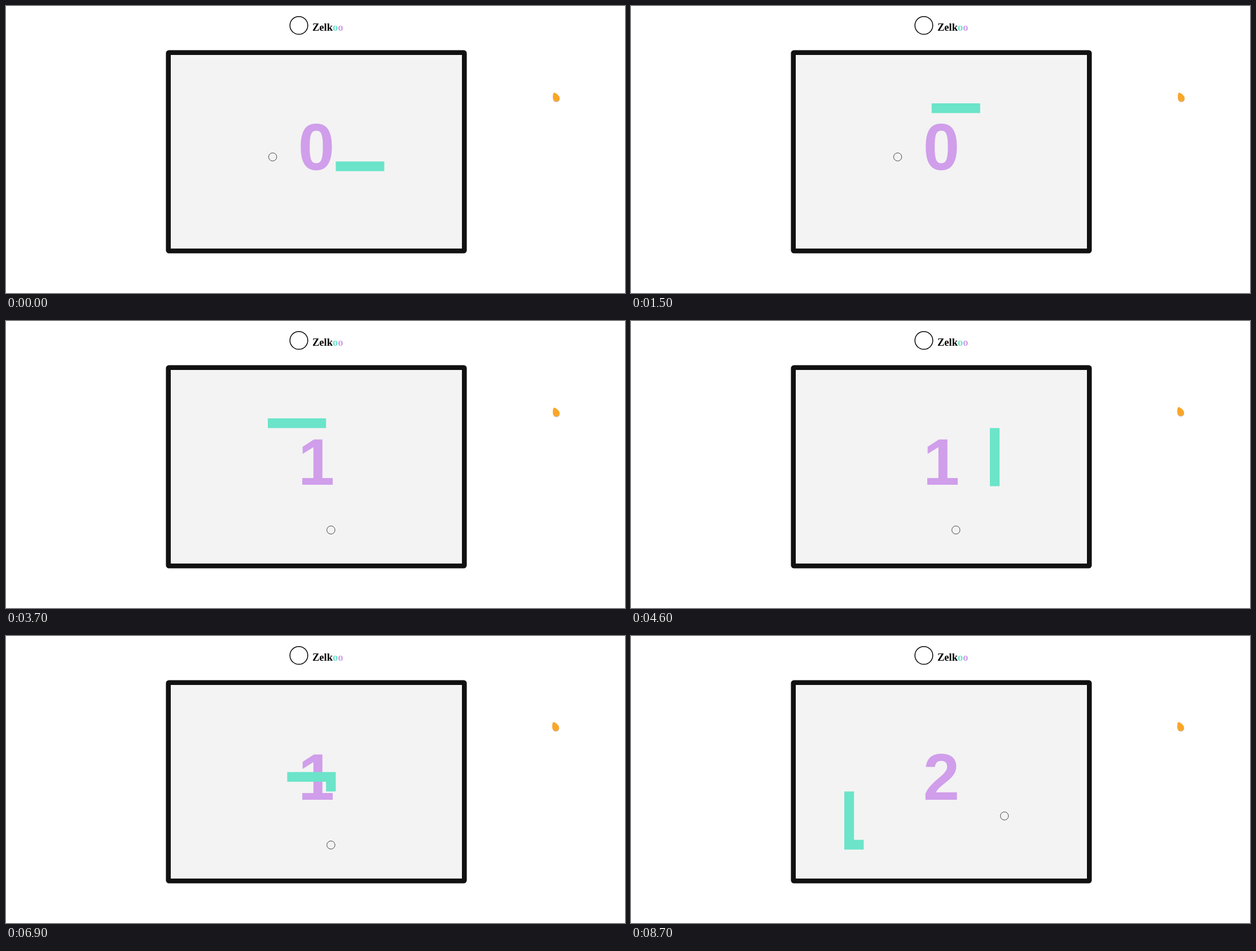
Recreate the animation shown at these times as an HTML page. Size 1097 by 510 pixels, loop 8.8 s.

```html
<!DOCTYPE html>
<html lang="en">
<head>
<meta charset="utf-8">
<title>Zelkoo</title>
<style>
  html, body { margin: 0; width: 100%; height: 100%; overflow: hidden; background: #fff; }
  svg { display: block; width: 1097px; height: 510px; }
  .title { font: bold 18.5px "Liberation Serif", serif; }
  .score { font: bold 116px "Liberation Sans", sans-serif; }
</style>
</head>
<body>
<svg viewBox="0 0 1097 510">
  <circle cx="519" cy="34.5" r="15.8" fill="#fff" stroke="#000" stroke-width="1.5"/>
  <text class="title" x="543" y="44">Zelk<tspan fill="#6be4c9">o</tspan><tspan fill="#d09eea">o</tspan></text>

  <rect x="283.4" y="78.4" width="533.2" height="361.2" rx="5.5" fill="#111"/>
  <rect x="292" y="87" width="516" height="344" fill="#f3f3f3"/>

  <text id="score" class="score" x="550" y="291" text-anchor="middle" fill="#d09eea">0</text>
  <circle id="food" r="7.2" fill="none" stroke="#444" stroke-width="1"/>
  <polyline id="snake" fill="none" stroke="#6be4c9" stroke-width="17.2"
    stroke-linecap="square" stroke-linejoin="miter"/>

  <g id="pointer">
    <path id="drop" transform="translate(.3 1)" fill="#000" opacity=".25"
      d="M969.6 156Q970.6 153.2 973.4 154.5Q977.2 156.4 980 160.2Q982.4 164.6 979.6 168Q975.2 171.6 971 168.2Q968.8 165.6 969.2 160Z"/>
    <use href="#drop" id="face"/>
  </g>
</svg>
<script>
const LOOP = 8800, FRAME = 100, TICK = 80.3, PHASE = 0.6;
const CELL = 17.2, LEFT = 292, TOP = 87, START_LENGTH = 5;
const POINTER_MOVE = 4100;

// Grid corners the head passes, beginning at the first tail cell.
const corners = [
  [21, 11], [11, 11], [11, 5], [19, 5], [19, 11], [10, 11], [10, 5], [20, 5],
  [20, 15], [9, 15], [9, 9], [16, 9], [16, 16], [5, 16], [5, 10]
];
const foods = [[10, 10], [16, 16], [21, 13]];
const meals = [36, 92];

const $ = id => document.getElementById(id);
const px = c => LEFT + (c + 0.5) * CELL;
const py = r => TOP + (r + 0.5) * CELL;

// The pointer face reuses the drop outline without its shadow styling.
const face = $("drop").cloneNode();
face.removeAttribute("id");
face.removeAttribute("transform");
face.removeAttribute("opacity");
face.setAttribute("fill", "#faa628");
$("face").replaceWith(face);

const route = [corners[0]];
for (const [x, y] of corners.slice(1)) {
  let [cx, cy] = route[route.length - 1];
  while (cx !== x || cy !== y) {
    cx += Math.sign(x - cx);
    cy += Math.sign(y - cy);
    route.push([cx, cy]);
  }
}

function draw(time) {
  const t = Math.floor((time % LOOP) / FRAME) * FRAME;
  const step = Math.floor(t / TICK + PHASE);
  const score = meals.filter(m => step >= m).length;
  const end = step + START_LENGTH;
  const body = route.slice(end - START_LENGTH - score, end);
  const [fx, fy] = foods[score];

  $("snake").setAttribute("points", body.map(([x, y]) => px(x) + "," + py(y)).join(" "));
  $("score").textContent = score;
  $("food").setAttribute("cx", px(fx));
  $("food").setAttribute("cy", py(fy) + 0.6);
  $("pointer").setAttribute("transform", t < POINTER_MOVE ? "" : "translate(-1 -1)");
}

const begin = performance.now();
function loop() {
  draw(performance.now() - begin);
  requestAnimationFrame(loop);
}
draw(0);
requestAnimationFrame(loop);
</script>
</body>
</html>
```
